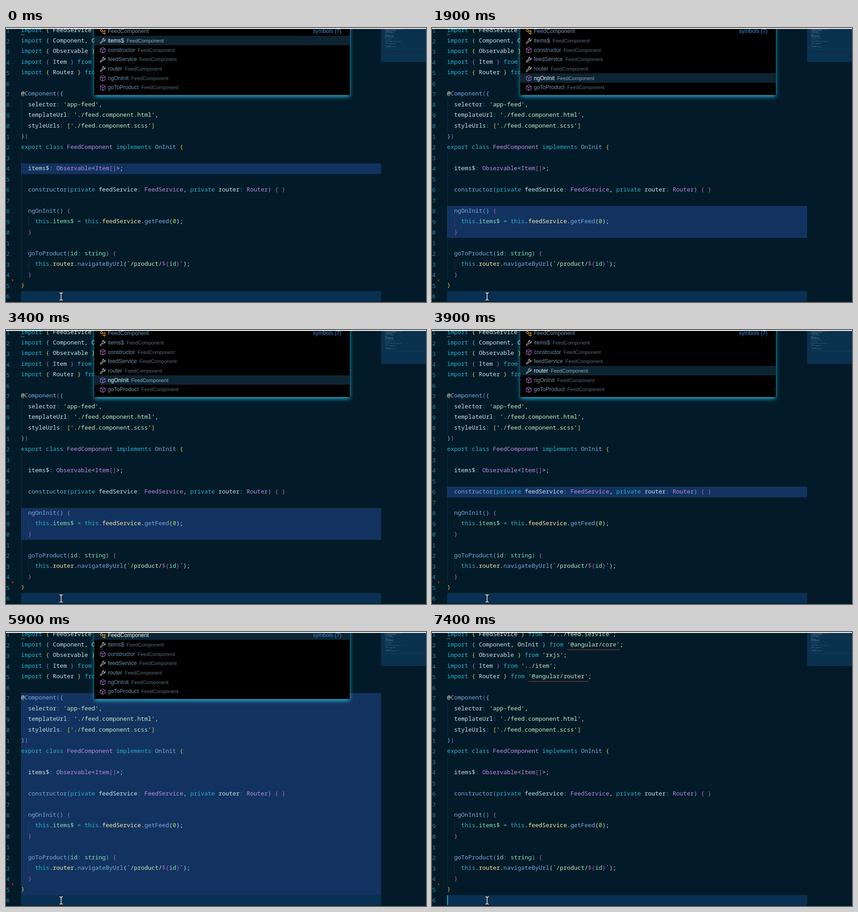
Write an HTML page with a canvas that moves like this. It is 926x605 px and loops after 8000 ms.

```html
<!DOCTYPE html>
<html lang="en">
<head>
<meta charset="utf-8">
<title>Go to symbol</title>
<style>
  html, body { margin: 0; width: 100%; height: 100%; overflow: hidden; background: #031b28; }
  canvas { display: block; width: 926px; height: 605px; }
</style>
</head>
<body>
<canvas id="stage" width="926" height="605"></canvas>
<script>
const ctx = document.getElementById('stage').getContext('2d');
const W = 926, H = 605, LOOP = 8000;
const LEFT = 33.3, CHAR = 7.77, LINE = 23.48, TOP = -6.2, EDGE = 827;
const MONO = '12.95px "Noto Sans Mono", "DejaVu Sans Mono", monospace';
const SANS = '"Liberation Sans", Arial, sans-serif';

// First letter of each token picks its colour.
const INK = {
  k: '#2aafd0', w: '#cbe2ea', p: '#b98bea', f: '#7ba7e0', s: '#c5e8c2',
  y: '#e6c33c', m: '#b25fc0', b: '#6fb6e2', g: '#8bdcb8', o: '#f2eaaa', n: '#a9dc62'
};

const CODE = [
  "kimport |y{ |wFeedService |y} |kfrom |s'./../feed.service'|w;",
  "kimport |b{ |wComponent, OnInit |b} |kfrom |s'@angular/core'|w;",
  "kimport |y{ |wObservable |y} |kfrom |s'rxjs'|w;",
  "kimport |m{ |wItem |m} |kfrom |s'../item'|w;",
  "kimport |y{ |wRouter |y} |kfrom |s'@angular/router'|w;",
  "",
  "o@|fComponent|m(|b{",
  "w  selector|k: |s'app-feed'|w,",
  "w  templateUrl|k: |s'./feed.component.html'|w,",
  "w  styleUrls|k: |y[|s'./feed.component.scss'|y]",
  "b}|m)",
  "kexport class |pFeedComponent |kimplements |fOnInit |y{",
  "",
  "w  items$|k: |pObservable|w<|pItem|m[]|w>;",
  "",
  "f  constructor(|kprivate |wfeedService|k: |pFeedService|w, |kprivate |wrouter|k: |pRouter|f) |m{ }",
  "",
  "f  ngOnInit() |m{",
  "k    this|w.|gitems$ |k= this|w.|ofeedService|w.|fgetFeed|w(|n0|w);",
  "m  }",
  "",
  "f  goToProduct(|gid|k: |gstring|f) |m{",
  "k    this|w.|orouter|w.|fnavigateByUrl|w(|s`/product/|m${|gid|m}|s`|w);",
  "m  }",
  "y}",
  ""
].map(line => {
  let col = 0;
  return line ? line.split('|').map(tok => {
    const text = tok.slice(1), part = { ink: INK[tok[0]], text, col };
    col += text.length;
    return part;
  }) : [];
});

const SYMBOLS = [
  { name: 'FeedComponent', icon: branch, from: 7, to: 25 },
  { name: 'items$', icon: wrench, from: 14, to: 14 },
  { name: 'constructor', icon: cube, from: 16, to: 16 },
  { name: 'feedService', icon: wrench, from: 16, to: 16 },
  { name: 'router', icon: wrench, from: 16, to: 16 },
  { name: 'ngOnInit', icon: cube, from: 18, to: 20 },
  { name: 'goToProduct', icon: cube, from: 22, to: 24 }
];

// [start time, selected symbol]; -1 closes the list.
const STEPS = [[0, 1], [300, 2], [1100, 3], [1500, 4], [1900, 5], [2600, 6], [3400, 5],
  [3900, 4], [4200, 3], [4500, 2], [5100, 1], [5900, 0], [7200, -1]];

const lineTop = n => TOP + (n - 1) * LINE;

function rect(color, x, y, w, h) {
  ctx.fillStyle = color;
  ctx.fillRect(x, y, w, h);
}

function label(text, x, y, color, font) {
  ctx.font = font;
  ctx.fillStyle = color;
  ctx.fillText(text, x, y);
  return ctx.measureText(text).width;
}

function poly(points, color, width, close) {
  ctx.beginPath();
  points.forEach(([x, y]) => ctx.lineTo(x, y));
  if (close) ctx.closePath();
  ctx.strokeStyle = color;
  ctx.lineWidth = width;
  ctx.stroke();
}

function wave(x0, x1, y, color) {
  const pts = [];
  for (let x = x0, i = 0; x <= x1; x += 2, i++) pts.push([x, y + (i % 2 ? 1 : -1)]);
  poly(pts, color, 1);
}

function wrench() {
  poly([[2.6, -5.5], [0, -4.6], [-0.9, -2.6], [-0.5, -0.8], [-5.5, 4], [-5.5, 5.1], [-4.7, 5.8],
    [-3.7, 5.5], [0.9, 0.6], [3, 1], [5, -0.3], [5.8, -3], [3.4, -1], [1.3, -2.8]], '#b9c0c4', 1.1, true);
}

function cube() {
  const c = '#a86cc4';
  poly([[0, -6], [5.4, -3.3], [5.4, 3], [0, 6], [-5.4, 3], [-5.4, -3.3]], c, 1.1, true);
  poly([[-5.4, -3.3], [0, -0.5], [5.4, -3.3]], c, 1.1);
  poly([[0, -0.5], [0, 6]], c, 1.1);
}

function branch() {
  const c = '#d99532';
  const diamond = (x, y, r) => poly([[x, y - r], [x + r, y], [x, y + r], [x - r, y]], c, 1.2, true);
  diamond(-3, -2.2, 2.9);
  diamond(4.2, -0.8, 1.8);
  diamond(4.2, 4.2, 1.8);
  poly([[0, -0.8], [2.4, -0.8]], c, 1.1);
  poly([[0.2, -0.8], [0.2, 4.2], [2.4, 4.2]], c, 1.1);
}

function drawCode() {
  const guide = (col, from, to) =>
    rect('rgba(120,150,165,.17)', LEFT + col * CHAR + 0.4, lineTop(from), 1, (to - from + 1) * LINE);
  guide(0, 8, 10);
  guide(0, 13, 24);
  guide(2, 19, 19);
  guide(2, 23, 23);
  CODE.forEach((line, i) => {
    const y = 8.5 + i * LINE;
    label(String((i + 1) % 10), 0.6, y + 1.6, '#2b84ad', MONO);
    for (const t of line) label(t.text, LEFT + t.col * CHAR, y, t.ink, MONO);
  });
  wave(33, 42, 14.5, '#c98a2c');
  wave(298, 414, 39, '#b23c3c');
  wave(213, 345, 109, '#b23c3c');
  ctx.fillStyle = '#b8321f';
  ctx.beginPath();
  ctx.moveTo(13, 554);
  ctx.lineTo(16.5, 557);
  ctx.lineTo(13.5, 560);
  ctx.fill();
}

function drawMinimap(scrolled) {
  rect('#0a324f', EDGE, 2, W - EDGE, scrolled ? 76 : 73);
  ctx.globalAlpha = 0.32;
  CODE.forEach((line, i) => {
    for (const t of line) {
      const body = t.text.trim(), lead = t.text.length - t.text.trimStart().length;
      rect(t.ink, 835 + (t.col + lead) * 0.5, 3.6 + i * 1.7, body.length * 0.5, 0.9);
    }
  });
  rect('#2a6f9c', 835, 46.5, W - 835, 0.8);
  ctx.globalAlpha = 0.7;
  rect('#a03a4a', 835, 2.6, 39, 1);
  rect('#a03a4a', 829, 42.5, 1.6, 1.4);
  ctx.globalAlpha = 1;
}

function drawList(sel) {
  ctx.save();
  ctx.shadowColor = '#2cc0e6';
  ctx.shadowBlur = 9;
  ctx.shadowOffsetY = 3;
  rect('#000', 194.5, -10, 563.5, 158);
  ctx.restore();
  SYMBOLS.forEach((s, i) => {
    const y = 11.3 + i * 20.68, on = i === sel;
    if (on) rect('#0d2533', 195, y - 14.6, 562.5, 20.7);
    ctx.save();
    ctx.translate(213.3, y - 3.6);
    s.icon();
    ctx.restore();
    const w = label(s.name, 224.4, y, on ? '#f2f7fa' : '#7092ab', '12.15px ' + SANS);
    if (i) label('FeedComponent', 230.2 + w, y, on ? '#93a9b8' : '#586d7b', '11px ' + SANS);
  });
  label('symbols (7)', 676.8, 11.3, '#3b86d8', '12.15px ' + SANS);
}

function drawPointer(alpha) {
  const shape = [
    [[117.8, 584.8], [120, 584.8], [121.5, 586], [123, 584.8], [125.2, 584.8]],
    [[121.5, 586], [121.5, 599.5]],
    [[117.8, 600.8], [120, 600.8], [121.5, 599.5], [123, 600.8], [125.2, 600.8]]
  ];
  ctx.globalAlpha = alpha;
  for (const p of shape) poly(p, '#06121a', 3.4);
  for (const p of shape) poly(p, '#fff', 1.6);
  ctx.globalAlpha = 1;
}

function pointerAlpha(t) {
  if (t < 6400 || t >= 7400) return 1;
  return Math.max(0, 1 - (Math.floor((t - 6400) / 100) + 1) / 4);
}

function draw(t) {
  const sel = STEPS.filter(s => s[0] <= t).pop()[1];
  const scroll = sel === 6 ? 41.5 : 0;
  rect('#031b28', 0, 0, W, H);

  ctx.save();
  ctx.translate(0, -scroll);
  rect('#093052', LEFT, lineTop(26), EDGE - LEFT, LINE - 0.4);
  if (sel >= 0) {
    const s = SYMBOLS[sel];
    rect('#12335f', LEFT, lineTop(s.from), EDGE - LEFT, (s.to - s.from + 1) * LINE);
  }
  drawCode();
  if (t >= 7400) rect('#2ba5cb', LEFT, lineTop(26) + 0.8, 2, LINE - 2);
  ctx.restore();

  drawMinimap(scroll > 0);
  if (sel >= 0) drawList(sel);
  const alpha = pointerAlpha(t);
  if (alpha) drawPointer(alpha);
  rect('#f8fafa', 0, 0, W, 2);
}

const start = performance.now();
function tick() {
  draw((performance.now() - start) % LOOP);
  requestAnimationFrame(tick);
}
tick();
</script>
</body>
</html>
```
